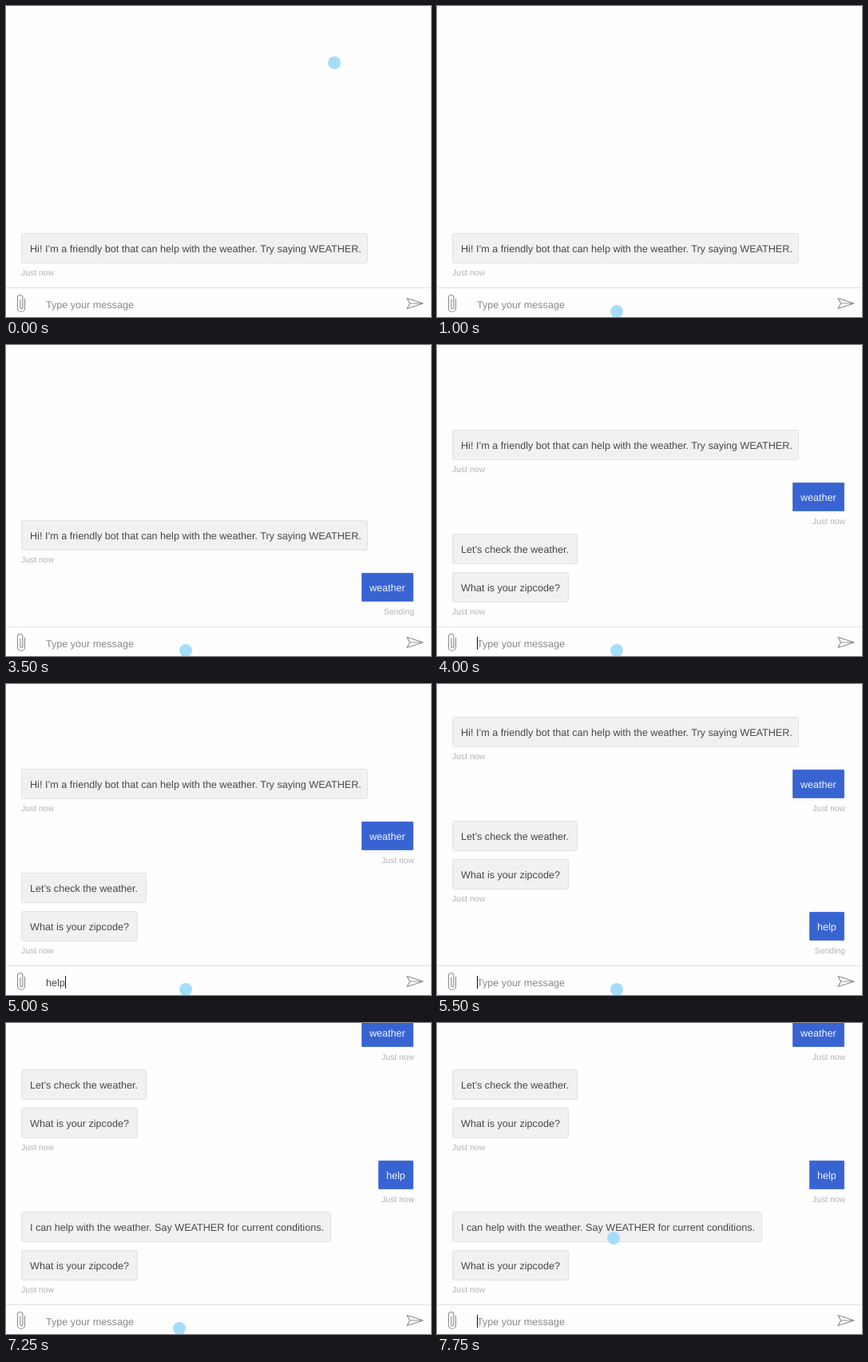
Animation, 532 px wide and 389 px high, one loop 8 s. Source, as an HTML page:

```html
<!DOCTYPE html>
<html lang="en">
<head>
<meta charset="utf-8">
<title>Weather chat</title>
<style>
  html, body { margin: 0; width: 100%; height: 100%; overflow: hidden; background: #fefefe; }
  svg {
    display: block; width: 532px; height: 389px;
    font: 12.6px "Liberation Sans", Arial, sans-serif; text-rendering: geometricPrecision;
  }
  text { fill: #484848; white-space: pre; }
  .bot { fill: #f1f1f1; stroke: #e2e2e2; }
  .user { fill: #3864d2; stroke: #4f76d8; }
  .user + text { fill: #f0f4ff; }
  .status { font-size: 10.4px; fill: #b2b2b2; }
  .placeholder { fill: #8a8a8a; }
  .icon { fill: none; stroke: #929292; stroke-width: 1.2; stroke-linejoin: round; }
</style>
</head>
<body>
<svg viewBox="0 0 532 389">
  <g id="thread"></g>
  <rect y="352" width="532" height="37" fill="#fefefe"/>
  <rect y="352" width="532" height="1" fill="#e2e2e2"/>
  <path class="icon" d="M23.5 366v12a4.5 4.5 0 0 1-9 0v-13.3a3.2 3.2 0 0 1 6.4 0v12.5a1.5 1.5 0 0 1-3 0v-10.5"/>
  <path class="icon" d="M502 365.5L522 372L502 378.5L505.5 372ZM505.5 372H522"/>
  <text id="field" x="50" y="378"></text>
  <rect id="caret" y="365" width="1" height="16" fill="#111"/>
  <circle id="pointer" r="8" fill="#a6ddfc"/>
</svg>
<script>
const LOOP = 8000, STEP = 250, BOTTOM = 284;
const $ = id => document.getElementById(id);
const thread = $('thread'), field = $('field'), caret = $('caret'), pointer = $('pointer');

// status: a line such as "Just now" stands below the bubble; sent: when it stops reading "Sending"
const messages = [
  { at: 0, y: 0, width: 434, text: 'Hi! I’m a friendly bot that can help with the weather. Try saying WEATHER.', status: true },
  { at: 3000, y: 65, width: 66, text: 'weather', status: true, user: true, sent: 4000 },
  { at: 4000, y: 130, width: 157, text: 'Let’s check the weather.' },
  { at: 4000, y: 178, width: 146, text: 'What is your zipcode?', status: true },
  { at: 5500, y: 243, width: 45, text: 'help', status: true, user: true, sent: 6000 },
  { at: 6000, y: 308, width: 388, text: 'I can help with the weather. Say WEATHER for current conditions.' },
  { at: 6000, y: 356, width: 146, text: 'What is your zipcode?', status: true }
];
const typed = [[0, ''], [1750, 'we'], [2000, 'wea'], [2250, 'weat'], [2500, 'weather'],
  [3000, ''], [4750, 'hel'], [5000, 'help'], [5500, '']];
const caretToggles = [1250, 3500, 4000, 4500, 4750, 6000, 6500, 7000, 7500];
const pointerPath = [[0, 411, 71], [250, 384, 138], [500, 388, 134], [750, 220, 382],
  [1000, 225, 382], [5750, 220, 382], [6250, 218, 382], [7250, 217, 382],
  [7500, 204, 368], [7750, 221, 269]];

const latest = (list, t) => list.filter(entry => entry[0] <= t).pop();

function add(parent, tag, attributes, content = '') {
  const node = document.createElementNS('http://www.w3.org/2000/svg', tag);
  for (const name in attributes) node.setAttribute(name, attributes[name]);
  node.textContent = content;
  return parent.appendChild(node);
}

for (const m of messages) {
  const left = m.user ? 511 - m.width : 19;
  const inset = m.user ? 1 : 0;
  m.group = add(thread, 'g', {});
  add(m.group, 'rect', {
    class: m.user ? 'user' : 'bot', x: left + 0.5, y: m.y + inset + 0.5,
    width: m.width - 1 - inset, height: 37 - 2 * inset, rx: m.user ? 0.5 : 2
  });
  add(m.group, 'text', { x: left + 11 - inset, y: m.y + 24 }, m.text);
  if (m.status) m.label = add(m.group, 'text', {
    class: 'status', x: m.user ? 511 : 19, y: m.y + 53,
    'text-anchor': m.user ? 'end' : 'start'
  }, 'Just now');
}

function draw(t) {
  let newest;
  for (const m of messages) {
    const shown = t >= m.at;
    m.group.style.display = shown ? '' : 'none';
    if (shown) newest = m;
    if (m.user) m.label.textContent = t < m.sent ? 'Sending' : 'Just now';
  }
  thread.setAttribute('transform', `translate(0 ${BOTTOM - newest.y})`);

  const text = latest(typed, t)[1];
  field.textContent = text || 'Type your message';
  field.setAttribute('class', text ? '' : 'placeholder');
  caret.setAttribute('x', 50 + (text ? Math.round(field.getComputedTextLength()) : 0));
  const caretOn = caretToggles.filter(at => at <= t).length % 2;
  caret.style.display = caretOn ? '' : 'none';

  const [, x, y] = latest(pointerPath, t);
  pointer.setAttribute('cx', x);
  pointer.setAttribute('cy', y);
}

const start = performance.now();
function frame() {
  const t = (performance.now() - start) % LOOP;
  draw(Math.floor(t / STEP) * STEP);
  requestAnimationFrame(frame);
}
frame();
</script>
</body>
</html>
```
